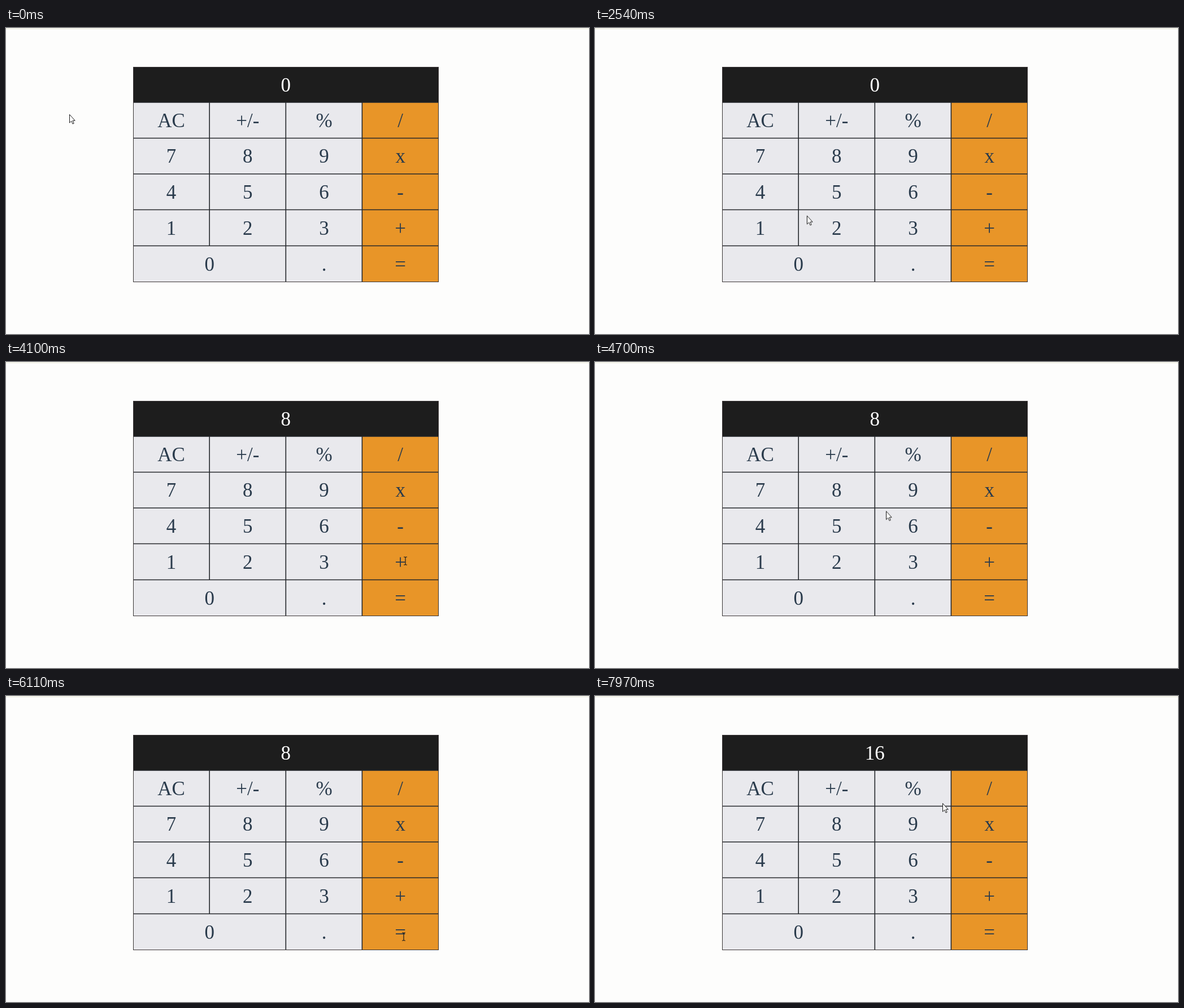
Animation of 1032 by 543 pixels, one loop 8 s. Source, as an HTML page:

```html
<!DOCTYPE html>
<html lang="en">
<head>
<meta charset="utf-8">
<title>Calculator</title>
<style>
html, body { margin: 0; width: 100%; height: 100%; overflow: hidden; background: #fdfdfc; }
svg { display: block; width: 1032px; height: 543px; }
text { font: 35px "Liberation Serif", "Times New Roman", serif; text-anchor: middle; fill: #2a3b4c; }
.screen text { fill: #fff; }
.grid { fill: none; stroke: #24272b; stroke-width: 1.6; }
.frame { fill: none; stroke: #3a3536; }

.zero, .eight, .sum { opacity: 0; animation: 8s step-end infinite; }
.zero { animation-name: zero; }
.eight { animation-name: eight; }
.sum { animation-name: sum; }
@keyframes zero { 0% { opacity: 1 } 44.5%, 100% { opacity: 0 } }
@keyframes eight { 0% { opacity: 0 } 44.5% { opacity: 1 } 77%, 100% { opacity: 0 } }
@keyframes sum { 0% { opacity: 0 } 77%, 100% { opacity: 1 } }

.pointer { animation: travel 8s ease-in-out infinite; }
.arrow { animation: arrow 8s step-end infinite; }
.beam { opacity: 0; animation: beam 8s step-end infinite; }
@keyframes travel {
  0%, 2.5% { transform: translate(112px, 153px) }
  10%, 20.7% { transform: translate(112px, 247px) }
  20.71% { transform: translate(290px, 330px) }
  26% { transform: translate(330px, 486px) }
  31% { transform: translate(372px, 340px) }
  36% { transform: translate(434px, 185px) }
  40%, 45% { transform: translate(440px, 234px) }
  50%, 53.5% { transform: translate(707px, 353px) }
  62%, 67.5% { transform: translate(432px, 226px) }
  75%, 78.5% { transform: translate(704px, 427px) }
  86%, 88.5% { transform: translate(702px, 220px) }
  97%, 100% { transform: translate(615px, 190px) }
}
@keyframes arrow {
  0%, 46%, 54.5%, 68.5%, 79.5%, 90%, 100% { opacity: 1 }
  38.5%, 49.5%, 60.5%, 73.5%, 84.5% { opacity: 0 }
}
@keyframes beam {
  0%, 46%, 54.5%, 68.5%, 79.5%, 90%, 100% { opacity: 0 }
  38.5%, 49.5%, 60.5%, 73.5%, 84.5% { opacity: 1 }
}
</style>
</head>
<body>
<svg viewBox="0 0 1032 543">
  <path d="M0 1.5H1032" stroke="#e9ead6"/>
  <rect x="225" y="132" width="405" height="318" fill="#e9e9ed"/>
  <rect x="630" y="132" width="136" height="318" fill="#e89528"/>
  <rect x="225" y="69" width="541" height="63" fill="#1d1d1d"/>
  <path class="grid" d="M225 132H766M225 195.5H766M225 259H766M225 322.5H766M225 386.5H766M360.2 132V386.5M495.3 132V450M630.4 132V450"/>
  <rect class="frame" x="225.5" y="69.5" width="540" height="381"/>
  <g class="screen">
    <text class="zero" x="495.3" y="113">0</text>
    <text class="eight" x="495.3" y="113">8</text>
    <text class="sum" x="495.3" y="113">16</text>
  </g>
  <g id="keys"></g>
  <g class="pointer">
    <path class="arrow" d="M.5 .5V15.2L3.8 12.1L6 17.2L8.2 16.2L6 11.3H10.2Z" fill="#fff" stroke="#1c1c1c" stroke-linejoin="round"/>
    <path class="beam" d="M-3 -7H-1L0 -6L1 -7H3M-3 7H-1L0 6L1 7H3M0 -6V6" fill="none" stroke="#1c1c1c" stroke-width="1.2"/>
  </g>
</svg>
<script>
const rows = ["AC +/- % /", "7 8 9 x", "4 5 6 -", "1 2 3 +"];
const keys = document.getElementById("keys");

function addKey(label, x, y) {
  const key = document.createElementNS("http://www.w3.org/2000/svg", "text");
  key.setAttribute("x", x);
  key.setAttribute("y", y);
  key.textContent = label;
  keys.append(key);
}

rows.forEach((row, r) => row.split(" ").forEach((label, c) =>
  addKey(label, 292.6 + c * 135.2, Math.round(175.7 + r * 63.7))));
addKey("0", 360.2, 431);
addKey(".", 563, 431);
addKey("=", 698.2, 431);
</script>
</body>
</html>
```
